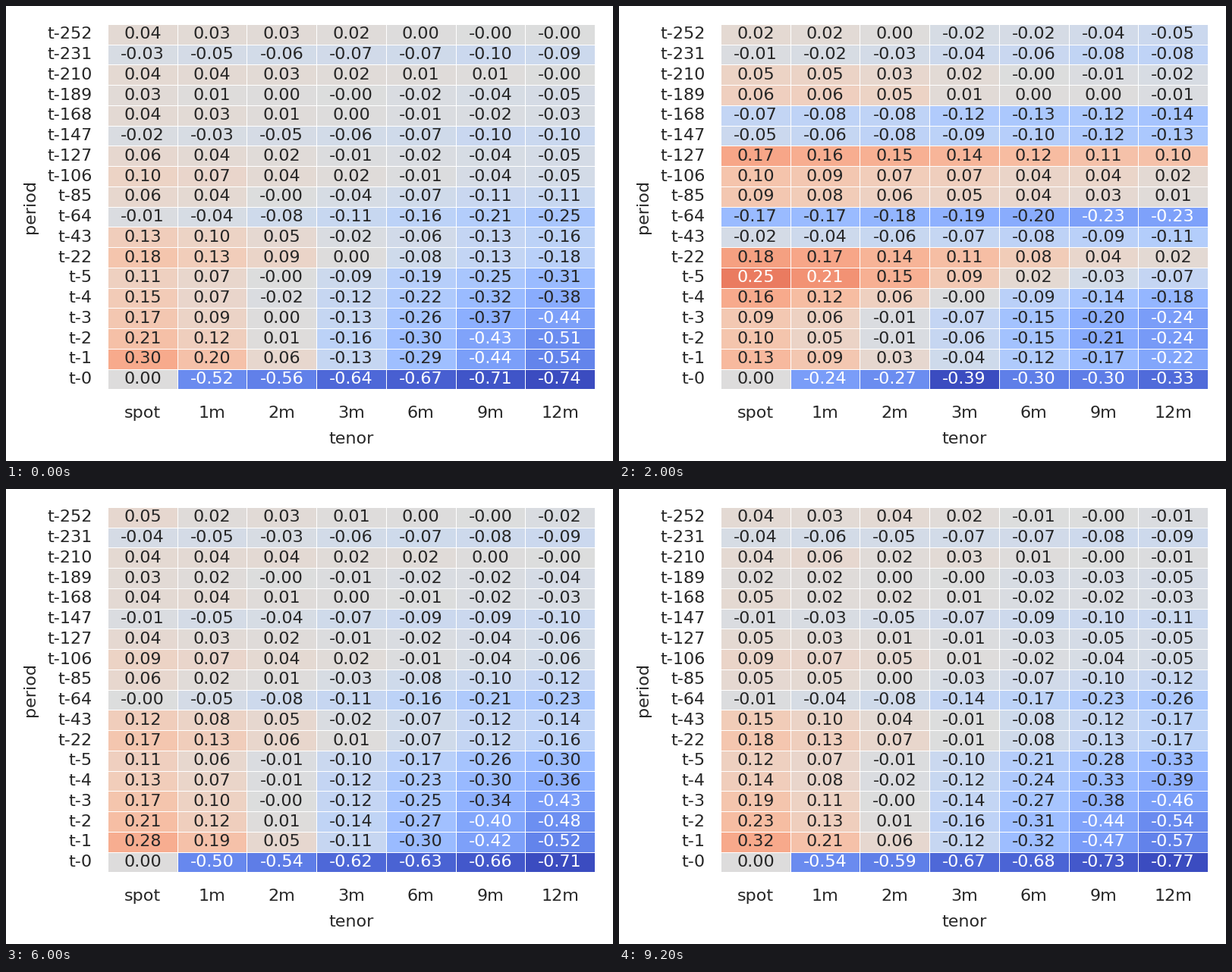
A matplotlib script for the animation above (10 s loop, 800 by 600 pixels).

```python
import matplotlib.pyplot as plt
import numpy as np
from matplotlib.animation import FuncAnimation

W, H, DPI = 800, 600, 100
LEFT, RIGHT, TOP, BOTTOM = 134.05, 775.91, 24, 505.37
INK = "0.15"
WHITE_FROM = 0.53  # share of the colour range where labels turn white
NOISE = 0.006

TENORS = ["spot", "1m", "2m", "3m", "6m", "9m", "12m"]
PERIODS = [*np.linspace(252, 22, 12).round().astype(int), *range(5, -1, -1)]
ROWS, COLS = len(PERIODS), len(TENORS)

age = np.arange(ROWS - 1)
u = np.linspace(0, 1, COLS)
ease = u - 0.05 * np.sin(2 * np.pi * u)  # gentle S from spot to 12m


class Curve:
    """Spot level per period, its fall towards 12m, and the t-0 row."""

    def __init__(self, spot, drop, near, far, dip):
        rows = np.array(spot)[:, None] / 100 - drop[:, None] * ease
        last = near + (far - near) * ease
        last[3] -= dip
        self.base = np.vstack([rows, last])

    def sample(self, scale, seed):
        noise = np.random.default_rng(seed).normal(0, NOISE, (ROWS, COLS))
        data = self.base * scale + noise
        data[-1, 0] = 0
        return data


steep = Curve(
    [4, -4, 5, 2, 4, -2, 5, 9, 6, -1, 13, 18, 12, 14, 18, 22, 31],
    0.05 + 0.82 * (age / 16) ** 2.6, near=-0.50, far=-0.75, dip=0.03)
flat = Curve(
    [2, -1, 5, 6, -7, -5, 16, 9, 8, -15, -3, 18, 23, 15, 9, 9, 12],
    0.065 + 0.255 / (1 + np.exp(-3 * (age - 11.2))),
    near=-0.22, far=-0.31, dip=0.09)

SCENES = [(steep, 0.98), (flat, 1.06), (flat, 0.94), (steep, 0.94),
          (steep, 1.03)]

plt.rcParams.update({
    "font.family": "DejaVu Sans", "font.size": 16, "text.color": INK,
    "axes.labelcolor": INK, "xtick.color": INK, "ytick.color": INK,
})
fig = plt.figure(figsize=(W / DPI, H / DPI), dpi=DPI, facecolor="white")
ax = fig.add_axes([LEFT / W, 1 - BOTTOM / H,
                   (RIGHT - LEFT) / W, (BOTTOM - TOP) / H])
mesh = ax.pcolormesh(steep.base, cmap="coolwarm", edgecolors="white",
                     linewidth=0.5)
ax.invert_yaxis()
for spine in ax.spines.values():
    spine.set_visible(False)

ax.set_xticks(np.arange(COLS) + 0.5, TENORS)
ax.set_yticks(np.arange(ROWS) + 0.5, [f"t-{p}" for p in PERIODS], va="center")
ax.tick_params(axis="x", length=0, pad=15.3)
ax.tick_params(axis="y", length=0, pad=14.7)
ax.set_xlabel("tenor", labelpad=10.2)
ax.set_ylabel("period", labelpad=8.5)

labels = [ax.text(c + 0.5, r + 0.5, "", ha="center", va="center")
          for r in range(ROWS) for c in range(COLS)]


def update(i):
    curve, scale = SCENES[i]
    data = curve.sample(scale, seed=i)
    span = np.abs(data).max()
    mesh.set_array(data)
    mesh.set_clim(-span, span)
    for label, v in zip(labels, data.flat):
        label.set_text(f"{v:.2f}")
        label.set_color("white" if abs(v) / span > WHITE_FROM else INK)
    return [mesh, *labels]


anim = FuncAnimation(fig, update, frames=len(SCENES), interval=2000,
                     repeat=True, repeat_delay=0)
plt.show()
```
